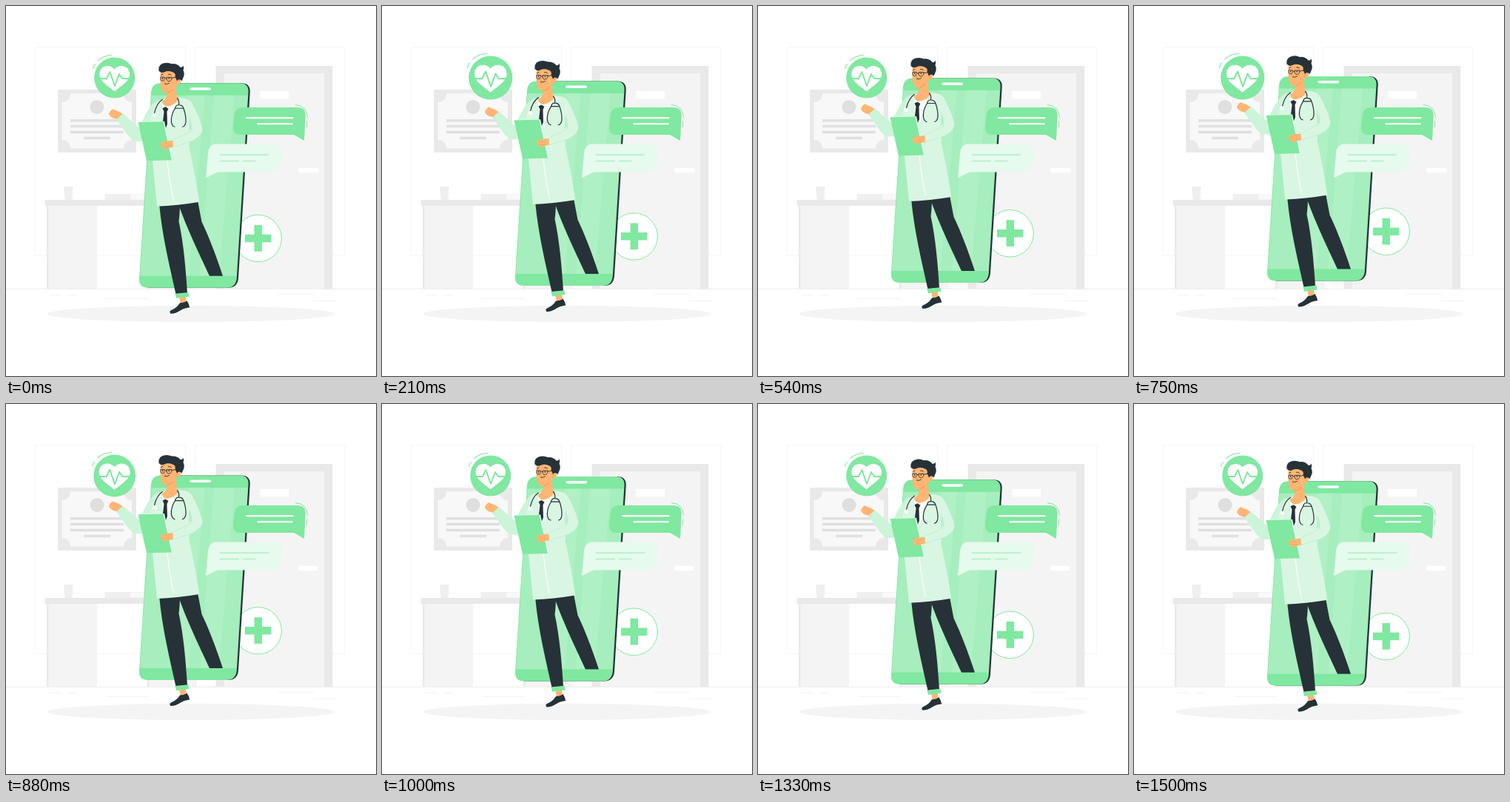
An HTML page for the animation above (1.54 s loop, 500 px wide and 500 px high).

```html
<!DOCTYPE html>
<html lang="en">
<head>
<meta charset="utf-8">
<title>Online doctor</title>
<style>
  html, body { margin: 0; width: 100%; height: 100%; overflow: hidden; background: #fff; }
  svg { display: block; width: 100vw; height: 100vh; }
  .green { fill: #80e8a0; }
  .dark { fill: #263238; }
  .skin { fill: #ffb573; }
  .coat { fill: #d9f6e2; }
  .g1 { fill: #e9e9e9; }
  .g2 { fill: #f4f4f4; }
  .line { fill: none; stroke-linecap: round; stroke-linejoin: round; }
</style>
</head>
<body>
<svg viewBox="0 0 500 500">
  <!-- room -->
  <g fill="none" stroke="#f6f6f6">
    <rect x="39.5" y="55.5" width="203" height="282"/>
    <rect x="255.5" y="55.5" width="202" height="282"/>
    <path stroke="#ececec" d="M0 382.3H500"/>
    <path stroke="#f3f3f3" d="M368 389.5H416M135 395.5H192M416 398.5H448M59 390.5H75M85 390.5H96"/>
  </g>
  <path class="g1" d="M283.5 382V81H441.3V382Z"/>
  <path class="g2" d="M295 382V91H430V382Z"/>
  <path fill="#fff" d="M343.500 115H382V125.500H343.500Z"/>
  <rect x="395" y="218.800" width="27" height="6.500" rx="3.200" fill="#fff"/>

  <path class="g1" d="M70 113H176V198H70Z"/>
  <path fill="#f8f8f8" d="M87 118H159A11 11 0 0 0 170 130V181A11 11 0 0 0 159 192.500H87A11 11 0 0 0 75.500 181V130A11 11 0 0 0 87 118Z"/>
  <circle cx="123" cy="136.500" r="9.500" fill="#dfdfdf"/>
  <path stroke="#e0e0e0" stroke-width="3.500" d="M87 154.700H159M87 162.600H159M87 170.500H159M105 178.500H141"/>

  <path class="g2" d="M55 270H123V382H55ZM191 270H258V382H191Z"/>
  <path class="g1" d="M52.500 262H260V270H52.500ZM55 270H57.500V382H55ZM191 270H193.500V382H191Z"/>
  <path fill="#efefef" d="M78 244H90.500L89.500 262H79.500ZM133.500 254H190V262H133.500Z"/>
  <path fill="#f9f9f9" d="M168 254.500H190V261.500H168Z"/>
  <ellipse class="g2" cx="249.500" cy="416" rx="194" ry="11.200"/>

  <g id="badge">
    <circle class="green" cx="146.700" cy="97" r="27.500"/>
    <path fill="#fff" d="M146.700 85.500C141 78 127 79.500 126.500 91.500C126 102 139 108.500 146.700 115.500C154 108.500 167.500 102 167 91.500C166.500 79.500 152 78 146.700 85.500Z"/>
    <path class="line" stroke="#80e8a0" stroke-width="2" d="M127 98H136L140.500 89L147 108L153 92L157 98H166.500"/>
    <path class="line" stroke="#80e8a0" stroke-width="1.100" d="M117.500 84.500A32 32 0 0 1 120.500 78.500M124.500 73.500A32 32 0 0 1 142.500 66.300"/>
  </g>

  <g id="float">
    <circle cx="340.600" cy="314.300" r="31.800" fill="#fff" stroke="#80e8a0"/>
    <path class="green" d="M335.500 296.300H346V309H358.500V319.500H346V332H335.500V319.500H323V309H335.500Z"/>

    <!-- phone -->
    <path class="dark" d="M211 104.500H318Q330.500 104.500 329.700 117L314 368Q313 381 300 381H192Z"/>
    <path class="green" d="M209 104.500H316Q328.300 104.500 327.500 117L311.800 368Q310.500 381 298 381H192Q179 381 180 368L196 117Q197 104.500 209 104.500Z"/>
    <path fill="#a6eebd" d="M196.600 121H326.600L311.300 365H181Z"/>
    <path fill="#fff" opacity=".1" d="M281 121H309L288 365H262ZM247 121H269L247 365H226Z"/>
    <rect x="248.500" y="110.500" width="28.500" height="3.500" rx="1.700" fill="#fff"/>

    <!-- legs -->
    <path class="dark" d="M233 265L259 263Q262 279 264.500 292C274 311 286 343 293 365H275C265 343 247 307 234 271Z"/>
    <path class="dark" d="M207 267L235 265Q235 281 233.500 291C240 321 243 356 245 388L229.500 389.500C222 355 211 312 207 267Z"/>
    <path class="skin" d="M234 393H243L243.500 401L236 403Z"/>
    <path class="green" d="M228.500 389L246.500 387.200L247.500 393L230 395.300Z"/>
    <path class="dark" d="M235 401.500Q241 401.500 244.500 398.500Q247 402 248.300 407.500Q240 408.500 236 411.500Q228 416.500 222.500 416Q219.500 413 224 411Q231 408 235 401.500Z"/>

    <!-- coat -->
    <path fill="#cbf4d8" d="M207 127C194 130 188 151 179 164.500L158 145.500L148 152.500C157 163 165 178 172 182Q181 186 190 179L207 155Z"/>
    <path class="coat" d="M212 126L232 124Q247 124 251 131C258 144 264 157 265.500 168Q263 178 248 184L247.500 191C253 216 258 242 261.300 265Q232 270 204 271L198 209L194 160C197 146 198 130 212 126Z"/>
    <path fill="#fff" opacity=".85" d="M211 132L217 136L230 131L219 164L212 159Z"/>
    <path fill="#b8efc9" d="M248 151L251.500 166L247 169Z"/>
    <path class="line" stroke="#bceecb" stroke-width=".8" d="M248 151Q252 159 251 169L226 181M225 191L248 184"/>
    <path class="line" stroke="#fff" d="M218 209Q221 239 226.500 263"/>
    <path class="skin" d="M217 111L230 108Q229 120 233 126Q228 135 217 136Q211 134 211 129Q218 126 217.500 118Z"/>
    <path class="dark" d="M211.500 138.500L215.500 136.500L219.500 139L217.500 143L218 160L215 167L211.500 160L213.500 143Z"/>

    <!-- stethoscope -->
    <path class="line" stroke="#263238" stroke-width="1.200" d="M211.500 126.500C206 130 202 138 200.500 145M231.500 125Q234.500 128 233.500 134M228.500 139Q229 134 233.500 134Q239 134 240 139M228.500 138.500H240M228.500 138.500Q222.500 148 223.500 157Q224.500 163 228 163.500M240 138.500Q243.500 149 243 157Q242 163 238.500 163.500"/>
    <circle cx="200.500" cy="147.500" r="2.600" fill="#fff"/>

    <!-- clipboard and hands -->
    <path fill="#ebfaf0" d="M181 156.500L214 156L225 208L191 209Z"/>
    <path class="green" d="M178.500 157.300L212.500 156.500L224 208.500L190 209.500Z"/>
    <path class="skin" d="M225.500 182L215 183Q209.500 184 209 187Q210 192 214 194L226 190.500Z"/>
    <path class="skin" d="M157.500 146L151.500 142.500L144 139.500Q140 142 139 146.500Q141 150.500 145 152L150 153Z"/>

    <!-- head -->
    <path class="skin" d="M209 89Q207.500 103 210 112Q212 118 218 117.500Q226 115 230 108Q237 106 236.500 99L232 87Z"/>
    <path class="dark" d="M206.500 88Q205 80 213 77.500Q219 76 224 78.500Q231 77.500 235.500 83Q239 83.500 239 80.500Q241 83 239.500 87Q242 92 239.500 97L237.500 101.500Q234 97.500 231 101.500L228.500 96Q230 91 225 89.500Q219 87 214 89.500Q210 91.500 206.500 88Z"/>
    <path class="line" stroke="#263238" stroke-width=".9" d="M209 96.500Q208 101.500 211.500 101.500Q215 101 214.500 97ZM217 97Q216.500 102 220.500 102Q224.500 101 224 97ZM214.500 98H217M224 97.500L231 96.500M214.500 105.500Q218 106.500 220.500 104.500M209.500 93.500L212 92.500M219.500 92.500Q222 92 223.500 93.500"/>
    <circle class="dark" cx="211.700" cy="98.200" r=".9"/>
    <circle class="dark" cx="220.300" cy="98.200" r=".9"/>
    <path class="line" stroke="#ee8b55" stroke-width=".8" d="M215 98L213.500 103L215.500 103.500M218 117.500Q223 116 226 113"/>
  </g>

  <!-- speech bubbles -->
  <path class="green" d="M321 137H393Q405 137 404.700 148L403 182L389 174H318Q306.500 174 307 163L308.500 148Q309.500 137 321 137Z"/>
  <path class="line" stroke="#fff" stroke-width="2.200" d="M325 151.200H387.500M340.500 159.200H386.500"/>
  <path class="line" stroke="#80e8a0" d="M391.500 133.500Q406.500 134.500 407.500 150M407 156L406.300 163.500"/>
  <path fill="#e6faed" d="M285 186.500H361Q373.500 186.500 372.500 199L371.500 213Q370 224.500 359 224.500H286L270 232.500L273 199Q274 186.500 285 186.500Z"/>
  <path class="line" stroke="#bdf2ce" stroke-width="2.200" d="M289.500 201.200H354M289.500 209.500H314M321 209.500H336.500"/>
</svg>
<script>
  const LOOP = 1540, RISE = 9.6, BEAT = 540, PULSE = 470;
  const badge = document.getElementById('badge');
  const floating = document.getElementById('float');
  const smooth = x => x * x * (3 - 2 * x);

  // Two heartbeats, then a rest.
  function beatScale(phase) {
    const x = phase < 2 * BEAT ? (phase % BEAT) / PULSE : 1;
    return 1 + 0.075 * smooth(Math.max(0, 1 - Math.abs(2 * x - 1)));
  }

  function draw(now) {
    const phase = (now + 20) % LOOP;
    const lift = RISE * (1 - Math.abs(2 * phase / LOOP - 1));
    floating.setAttribute('transform', `translate(0 ${-lift})`);
    badge.setAttribute('transform',
      `translate(146.7 97) scale(${beatScale(phase)}) translate(-146.7 -97)`);
  }

  const start = performance.now();
  function tick() {
    draw(performance.now() - start);
    requestAnimationFrame(tick);
  }
  tick();
</script>
</body>
</html>
```
